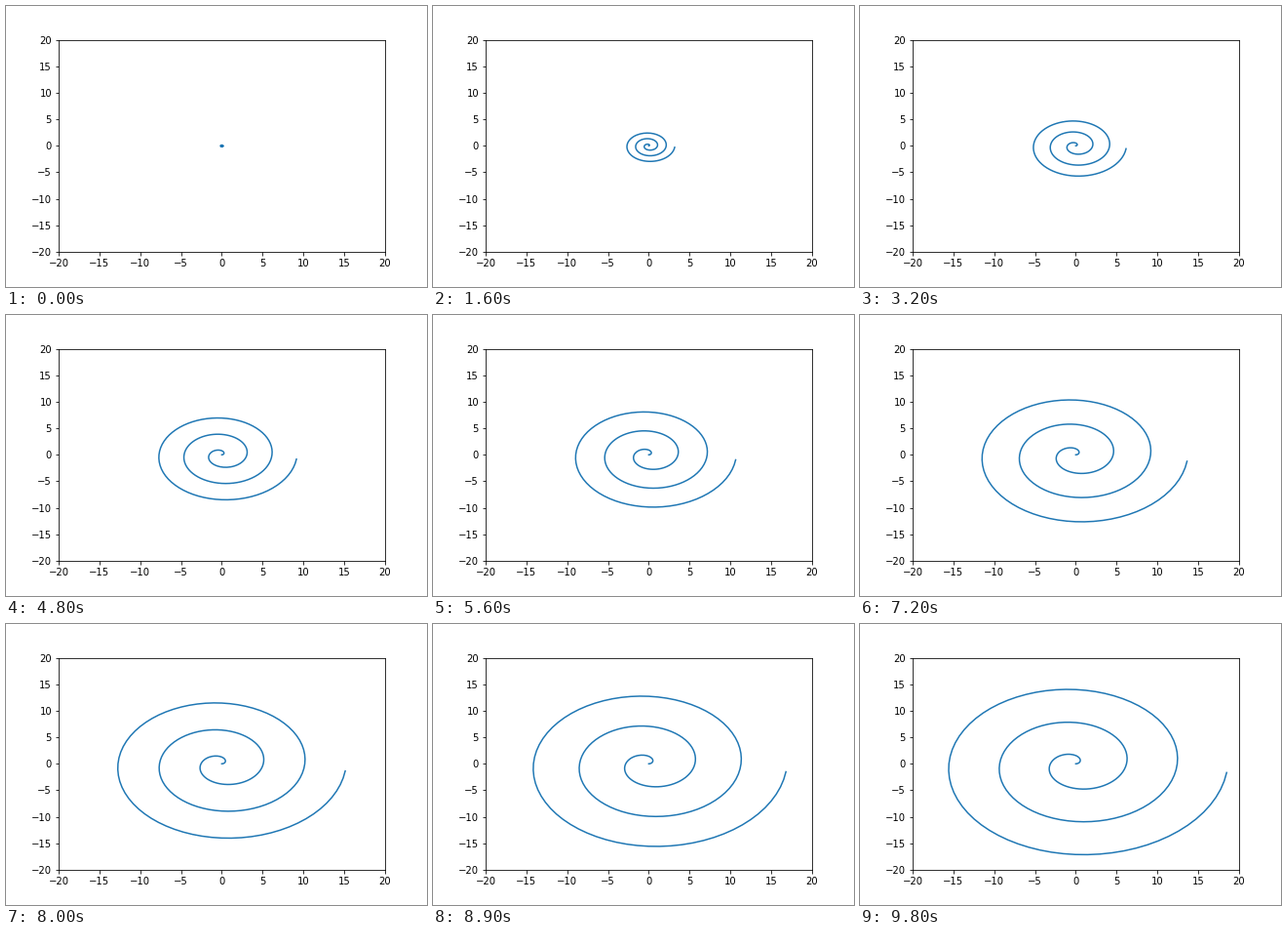
Recreate the animation shown at these times as a matplotlib script. Size 432 by 288 pixels, loop 9.9 s.

```python
import numpy as np
import matplotlib.pyplot as plt
from matplotlib.animation import FuncAnimation

FRAMES = 99
INTERVAL = 100  # ms
THETA = np.linspace(0, 18.76, 216)  # just short of three turns

fig, ax = plt.subplots(figsize=(6, 4), dpi=72)
fig.subplots_adjust(left=0.125, right=0.9, bottom=0.125, top=0.88)
ax.set(xlim=(-20, 20), ylim=(-20, 20))
ax.set_xticks(range(-20, 21, 5))
ax.set_yticks(range(-20, 21, 5))
line, = ax.plot([], [], color="#1f77b4", lw=1.5)


def update(i):
    """Widen the spiral by one hundredth per step."""
    r = (i + 1) / 100 * THETA
    line.set_data(r * np.cos(THETA), r * np.sin(THETA))
    return line,


anim = FuncAnimation(fig, update, frames=FRAMES, interval=INTERVAL, repeat=True)
plt.show()
```
